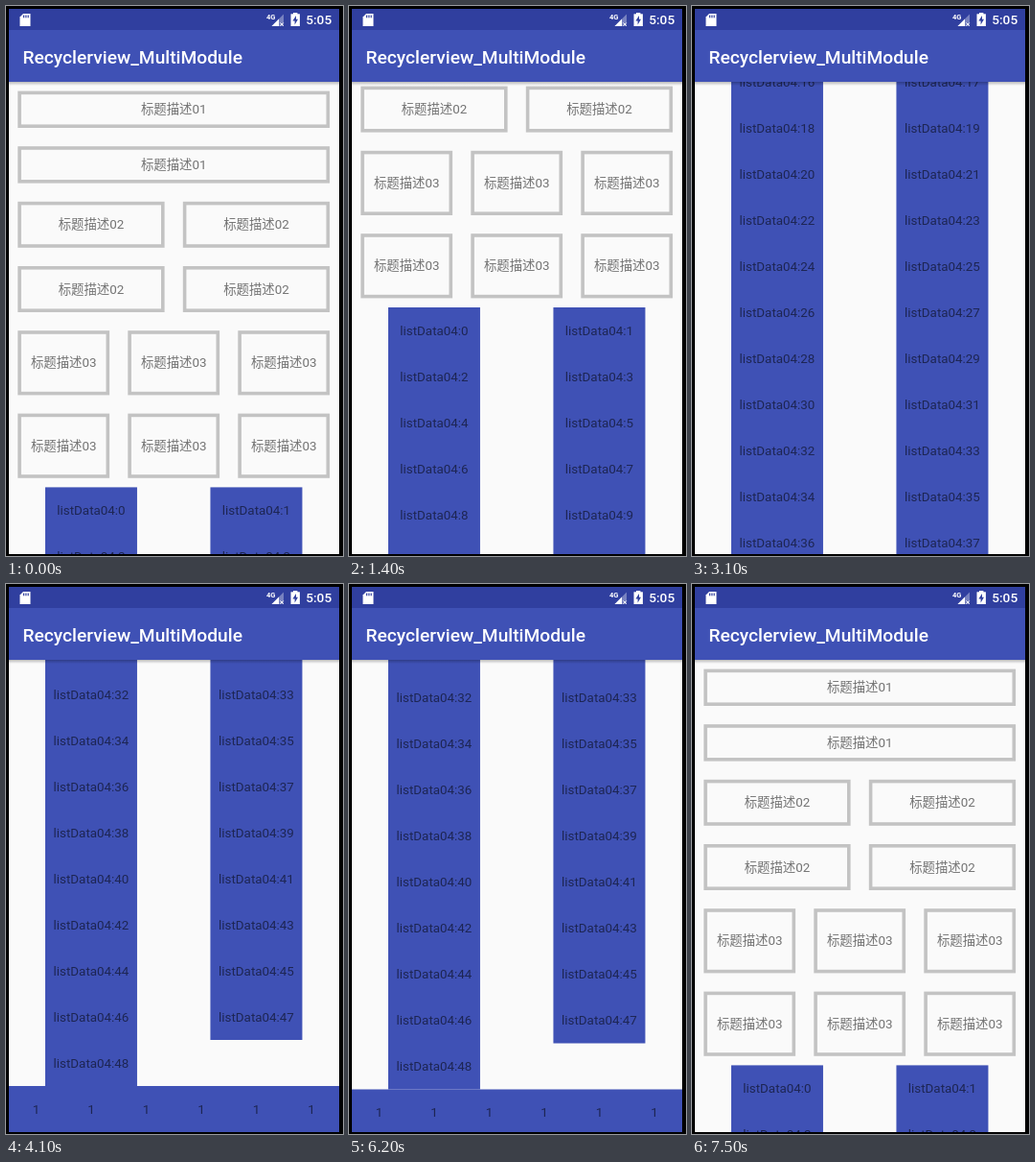
Recreate the animation shown at these times as an HTML page with a canvas. Size 352 by 573 pixels, loop 8100 ms.

```html
<!DOCTYPE html>
<html lang="zh-CN">
<head>
<meta charset="utf-8">
<title>Recyclerview_MultiModule</title>
<style>
  html, body { margin: 0; width: 100%; height: 100%; overflow: hidden; background: #000; }
  canvas { display: block; width: 352px; height: 573px; }
</style>
</head>
<body>
<canvas id="stage"></canvas>
<script>
const W = 352, H = 573, LOOP = 8100, TICK = 100;
const DP = 0.96;
const LEFT = 2.7, WIDTH = 345, TOP = 79, BOTTOM = 571;
const MAX_SCROLL = 1178.4, REST = 1174.9, FIRST_STOP = 187.4;
const MARGIN = 10 * DP, ROW = 50 * DP, LAST_ITEM = 48;
const BLUE = '#3f51b5', DARK_BLUE = '#303f9f', PAPER = '#fafafa';
const FONT = 'Roboto, "Noto Sans CJK SC", "Noto Sans CJK JP", "Noto Sans CJK", sans-serif';

const canvas = document.getElementById('stage');
const ctx = canvas.getContext('2d');
const ratio = window.devicePixelRatio || 1;
canvas.width = W * ratio;
canvas.height = H * ratio;

function rect(x, y, w, h, color) {
  ctx.fillStyle = color;
  ctx.fillRect(x, y, w, h);
}

function polygon(points, color) {
  ctx.beginPath();
  points.forEach(([x, y]) => ctx.lineTo(x, y));
  ctx.closePath();
  ctx.fillStyle = color;
  ctx.fill();
}

function text(str, x, y, { size = 13.4, weight = 400, color = '#fff', align = 'left' } = {}) {
  ctx.font = `${weight} ${size}px ${FONT}`;
  ctx.textAlign = align;
  ctx.fillStyle = color;
  ctx.fillText(str, x, y);
}

function label(str, x, centerY) {
  text(str, x, centerY + 4.6, { color: 'rgba(0,0,0,0.54)', align: 'center' });
}

const easeOut = p => 1 - (1 - p) ** 1.29;
const thereAndBack = p => Math.sin(Math.PI * p);

// start, end, scroll before, scroll at full ease, easing
const moves = [
  [700, 1400, 0, FIRST_STOP, easeOut],
  [2100, 3900, FIRST_STOP, MAX_SCROLL, easeOut],
  [4500, 5400, MAX_SCROLL, MAX_SCROLL - 279.2, thereAndBack],
  [6100, 6200, MAX_SCROLL, REST, easeOut],
  [6500, 7400, REST, 0, easeOut]
];

function scrollAt(time) {
  let scroll = 0;
  for (const [start, end, from, to, ease] of moves) {
    if (time < start) break;
    const p = Math.min(1, (time - start) / (end - start));
    scroll = from + (to - from) * ease(p);
  }
  return scroll;
}

function drawCards(y, columns, height) {
  const cell = WIDTH / columns, stroke = 3.6;
  for (let i = 0; i < columns; i++) {
    const x = LEFT + i * cell + MARGIN;
    ctx.strokeStyle = '#c3c3c3';
    ctx.lineWidth = stroke;
    ctx.strokeRect(x + stroke / 2, y + MARGIN + stroke / 2,
      cell - 2 * MARGIN - stroke, height - stroke);
    label('标题描述0' + columns, LEFT + (i + 0.5) * cell, y + MARGIN + height / 2);
  }
}

function drawContent(scroll) {
  let y = TOP - scroll;
  [[1, 40], [2, 50], [3, 70]].forEach(([columns, dp]) => {
    for (let n = 0; n < 2; n++) {
      drawCards(y, columns, dp * DP);
      y += dp * DP + 2 * MARGIN;
    }
  });

  const itemWidth = 100 * DP;
  for (let side = 0; side < 2; side++) {
    const center = LEFT + WIDTH * (0.25 + side * 0.5);
    const rows = 25 - side;
    rect(center - itemWidth / 2, y, itemWidth, rows * ROW, BLUE);
    for (let i = side; i <= LAST_ITEM; i += 2) {
      label('listData04:' + i, center, y + ((i - side) / 2 + 0.5) * ROW);
    }
  }

  y += 25 * ROW;
  rect(LEFT, y, WIDTH + 1, ROW, BLUE);
  for (let i = 0; i < 6; i++) label('1', LEFT + (i + 0.5) * WIDTH / 6, y + ROW / 2);
}

function drawStatusIcons() {
  // memory card
  polygon([[18, 8], [25.5, 8], [25.5, 21], [14.5, 21], [14.5, 11.5]], '#fff');
  [18, 20.3, 22.6].forEach(x => rect(x, 9.5, 1.2, 2.8, DARK_BLUE));

  // mobile signal
  polygon([[290, 8.5], [290, 21], [277.5, 21]], 'rgba(255,255,255,0.35)');
  polygon([[285, 13.5], [285, 21], [277.5, 21]], '#fff');
  ctx.strokeStyle = '#fff';
  ctx.lineWidth = 1;
  ctx.beginPath();
  ctx.moveTo(286.5, 17.5); ctx.lineTo(289.7, 20.7);
  ctx.moveTo(289.7, 17.5); ctx.lineTo(286.5, 20.7);
  ctx.stroke();
  text('4G', 272, 14, { size: 7.5, weight: 700 });

  // charging battery
  rect(300, 7, 4.4, 2, '#fff');
  rect(297.5, 8.3, 9.4, 12.7, '#fff');
  polygon([[303, 10], [299.4, 15.4], [301.6, 15.4], [301.6, 19.4], [305, 13.8], [303, 13.8]], DARK_BLUE);

  text('5:05', 313.2, 19.2, { size: 13.7, weight: 500 });
}

function drawBars() {
  const shadow = ctx.createLinearGradient(0, TOP, 0, TOP + 4);
  shadow.addColorStop(0, 'rgba(0,0,0,0.25)');
  shadow.addColorStop(1, 'rgba(0,0,0,0)');
  rect(3, TOP, WIDTH, 4, shadow);
  rect(3, 3, WIDTH, 22, DARK_BLUE);
  rect(3, 25, WIDTH, TOP - 25, BLUE);
  drawStatusIcons();
  text('Recyclerview_MultiModule', 17.5, 60, { size: 19.2, weight: 500 });
}

function draw(time) {
  ctx.setTransform(ratio, 0, 0, ratio, 0, 0);
  rect(0, 0, W, H, '#000');
  ctx.save();
  ctx.beginPath();
  ctx.rect(3, TOP, WIDTH, BOTTOM - TOP);
  ctx.clip();
  rect(3, TOP, WIDTH, BOTTOM - TOP, PAPER);
  drawContent(scrollAt(time));
  ctx.restore();
  drawBars();
}

const begin = performance.now();
function tick() {
  const elapsed = (performance.now() - begin) % LOOP;
  draw(Math.floor((elapsed + 1) / TICK) * TICK);
  requestAnimationFrame(tick);
}
tick();
</script>
</body>
</html>
```
